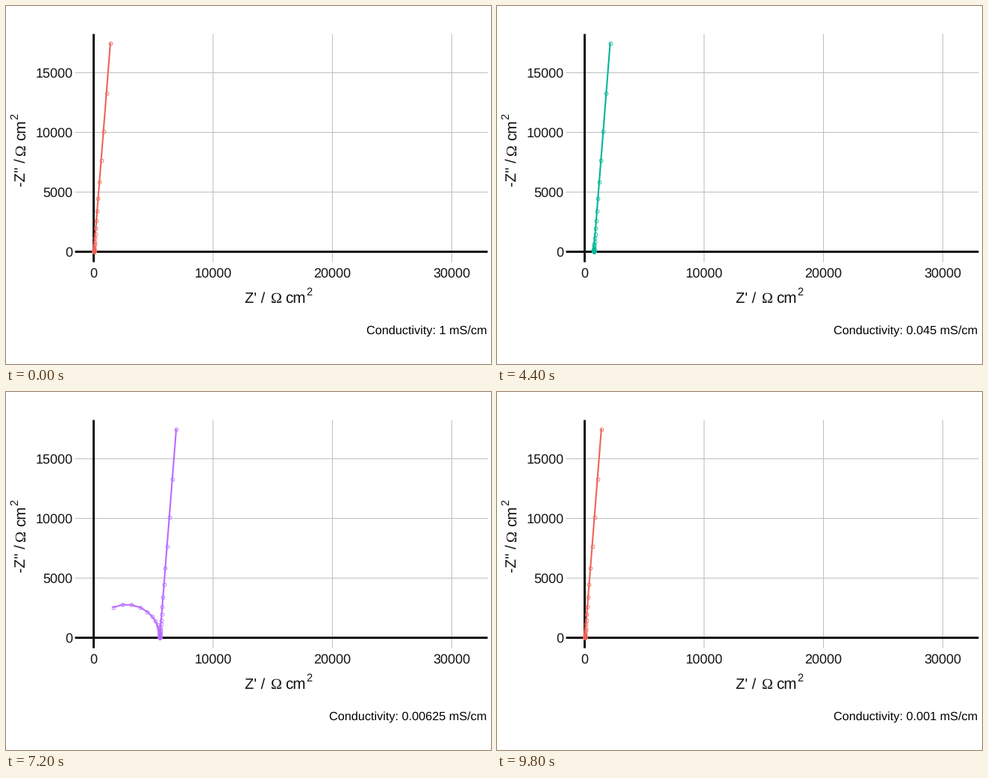
A matplotlib script for the animation above (10000 ms loop, 650x480 px).

```python
import numpy as np
import matplotlib
import matplotlib.pyplot as plt
from matplotlib.animation import FuncAnimation

matplotlib.rcParams["text.hinting"] = "none"

W, H, DPI = 650, 480, 100
PT = 72 / DPI                       # points per pixel
FRAMES, STEP_MS = 50, 200
X0, Y0, UNIT = 117.3, 329.4, 160 / 10000
LEFT, RIGHT, TOP, BOTTOM = 92, 644.5, 37, 343
SANS, SERIF = "Liberation Sans", "Liberation Serif"
INK = "#141111"

# Cell model: parallel R and C, in series with a constant phase element
FREQ = np.logspace(6, -1, 57)
OMEGA = 2 * np.pi * FREQ
CELL = 34.7                         # resistance times conductivity
CAP = 4.38e-11
ALPHA = 0.95
TAIL = 17490 * (OMEGA / OMEGA[-1]) ** -ALPHA * np.exp(-0.5j * np.pi * ALPHA)


def conductivity(step):
    return 10 ** (-3 * step / (FRAMES - 1))


def impedance(step):
    res = CELL / conductivity(step)
    return res / (1 + 1j * OMEGA * res * CAP) + TAIL


def hue_color(hue, chroma=110, light=60):
    """Polar LUV colour converted to sRGB."""
    h = np.radians(hue)
    u = chroma * np.cos(h) / (13 * light) + 0.1978
    v = chroma * np.sin(h) / (13 * light) + 0.4683
    y = ((light + 16) / 116) ** 3
    x = y * 9 * u / (4 * v)
    z = y * (12 - 3 * u - 20 * v) / (4 * v)
    to_rgb = np.array([[3.2406, -1.5372, -0.4986],
                       [-0.9689, 1.8758, 0.0415],
                       [0.0557, -0.2040, 1.0570]])
    lin = np.clip(to_rgb @ [x, y, z], 0, 1)
    rgb = np.where(lin <= 0.0031308, 12.92 * lin,
                   1.055 * lin ** (1 / 2.4) - 0.055)
    return tuple(np.clip(rgb, 0, 1))


fig = plt.figure(figsize=(W / DPI, H / DPI), dpi=DPI, facecolor="white")
ax = fig.add_axes([0, 0, 1, 1])
ax.set_xlim(0, W)
ax.set_ylim(H, 0)
ax.axis("off")


def label(x, y, text, size, ha="left", font=SANS, color=INK, rotation=0):
    return ax.text(x, y, text, fontsize=size * PT, family=font, color=color,
                   ha=ha, va="baseline", rotation=rotation,
                   rotation_mode="anchor")


def rule(xs, ys, color, width, z):
    ax.plot(xs, ys, color=color, lw=width * PT, zorder=z,
            solid_capstyle="butt")


def axis_title(start, unit, place, symbol, rotation=0):
    """Write a title along a run; place maps (along, rise) to the stage."""
    parts = [(start, 0, symbol, 20, SANS),
             (unit, 0, "Ω", 20, SERIF),
             (unit + 19.5, 0, "cm", 20.7, SANS),
             (unit + 48, 9.7, "2", 14.5, SANS)]
    for along, rise, text, size, font in parts:
        label(*place(along, rise), text, size, font=font, rotation=rotation)


for value in (0, 10000, 20000, 30000):
    x = X0 + value * UNIT
    main = value == 0
    rule([x, x], [TOP, BOTTOM], INK if main else "#bfbfbf",
         3 if main else 1, 2 if main else 1)
    label(x, 364, str(value), 18, "center")

for value in (0, 5000, 10000, 15000):
    y = Y0 - value * UNIT
    main = value == 0
    rule([LEFT, RIGHT], [y, y], INK if main else "#bfbfbf",
         3 if main else 1, 2 if main else 1)
    label(89.5, y + 6.3, str(value), 18, "right")

axis_title(320.5, 354.7, lambda a, r: (a, 398 - r), "Z' /")
axis_title(-242.5, -199.5, lambda a, r: (26 - r, -a), "-Z'' /", 90)

caption = label(RIGHT, 440, "", 16.2, "right", color="black")
curve, = ax.plot([], [], "-o", lw=2.1 * PT, ms=4.8 * PT, mfc="none",
                 mew=0.8 * PT, zorder=3, solid_joinstyle="round")


def draw(step):
    pose = step % (FRAMES - 1)      # the curve is back at its start at the end
    z = impedance(pose)
    color = hue_color(15 + 7.42 * pose)
    curve.set_data(X0 + z.real * UNIT, Y0 + z.imag * UNIT)
    curve.set_color(color)
    curve.set_markeredgecolor(color)
    caption.set_text(f"Conductivity: {conductivity(step):.3g} mS/cm")
    return curve, caption


anim = FuncAnimation(fig, draw, frames=FRAMES, interval=STEP_MS,
                     init_func=lambda: draw(0), repeat=True, repeat_delay=0)
plt.show()
```
